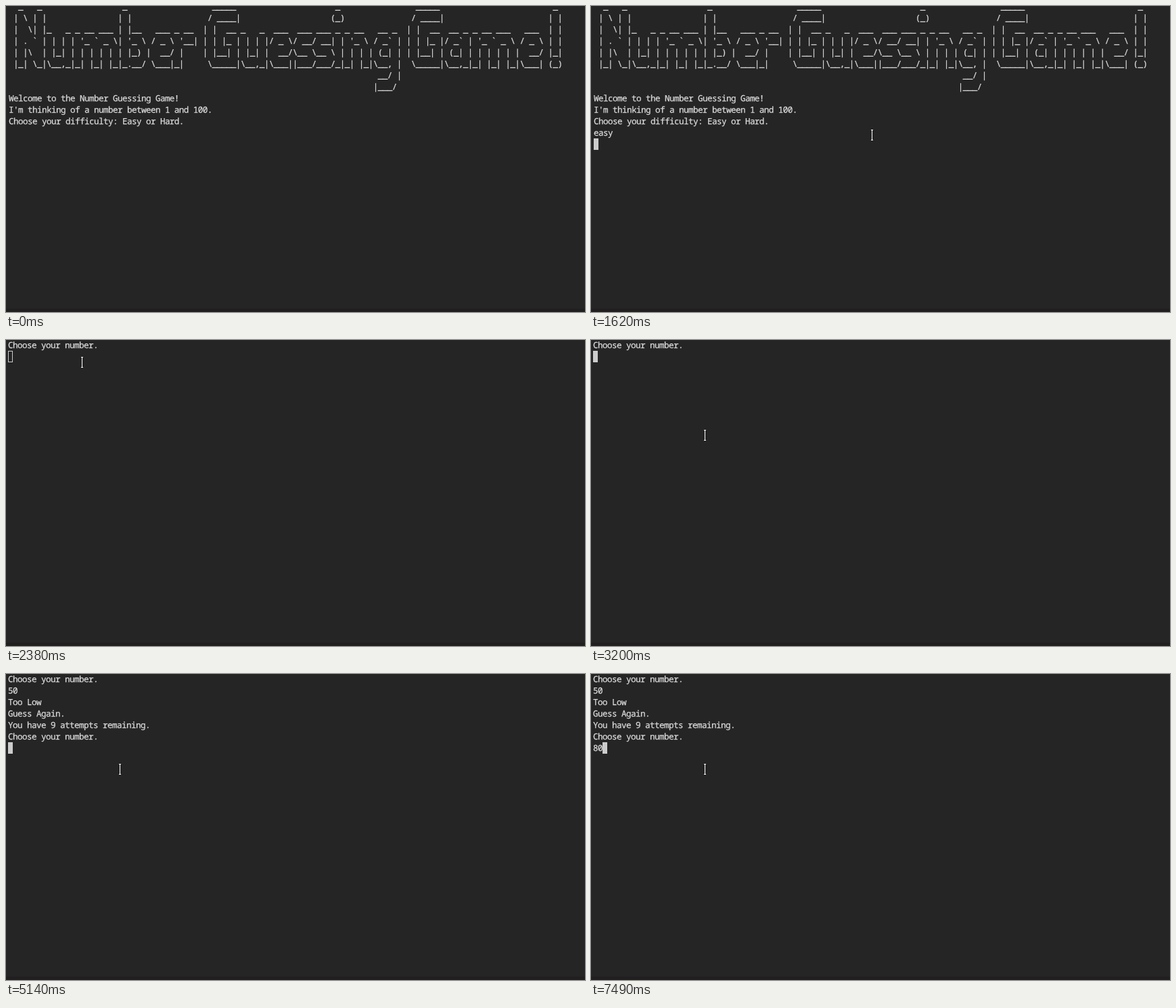
Write an HTML page that moves like this. It is 856 px wide and 453 px high and loops after 8000 ms.

```html
<!DOCTYPE html>
<html lang="en">
<head>
<meta charset="utf-8">
<title>Number guessing terminal</title>
<style>
html, body { margin: 0; width: 100%; height: 100%; overflow: hidden; background: #252525; }
#stage { position: relative; width: 856px; height: 453px; overflow: hidden; background: #252525; }
#strip { position: absolute; left: 0; top: 448px; width: 856px; height: 5px; background: #221f20; }
pre {
  position: absolute; margin: 0; color: #dcdcdc;
  font: 12.6px/17px "Noto Sans Mono", monospace;
  letter-spacing: calc(7px - .6em); /* terminal grid of 7px cells */
  -webkit-text-stroke: .25px #dcdcdc;
  font-variant-ligatures: none; text-rendering: geometricPrecision;
}
#caret { position: absolute; width: 7px; height: 17px; box-sizing: border-box; border: 1px solid #ccc; }
svg { position: absolute; left: 0; top: 0; }
</style>
</head>
<body>
<div id="stage">
  <div id="strip"></div>
  <pre id="term"></pre>
  <div id="caret"></div>
  <svg width="856" height="453" shape-rendering="crispEdges">
    <path id="beam" fill="#fff" d="M-1-8h3v1h-1v14h1v1h-3v-1h1v-14h-1z"/>
    <path id="arrow" fill="#fff" stroke="#000" d="M.5.5v16l4-4 3 6 2-1-3-6h5z"/>
  </svg>
</div>
<script>
const LOOP = 8000, CELL = 7, LINE = 17;
const $ = id => document.getElementById(id);
const term = $("term"), caret = $("caret"), beam = $("beam"), arrow = $("arrow");

// Builds a line from [column, text] pairs.
const row = (...parts) => parts.reduce((s, [col, text]) => s.padEnd(col) + text, "");

const banner = [
  row([2, "_"], [6, "_"], [24, "_"], [43, "_____"], [69, "_"], [86, "_____"], [115, "_"]),
  row([1, "| \\ | |"], [23, "| |"], [42, "/ ____|"], [68, "(_)"], [85, "/ ____|"], [114, "| |"]),
  " |  \\| |_   _ _ __ ___ | |__   ___ _ __ " +
    " | |  __ _   _  ___  ___ ___ _ _ __   __ _ " +
    " | |  __  __ _ _ __ ___   ___  | |",
  " | . ` | | | | '_ ` _ \\| '_ \\ / _ \\ '__|" +
    " | | |_ | | | |/ _ \\/ __/ __| | '_ \\ / _` |" +
    " | | |_ |/ _` | '_ ` _ \\ / _ \\ | |",
  " | |\\  | |_| | | | | | | |_) |  __/ |   " +
    " | |__| | |_| |  __/\\__ \\__ \\ | | | | (_| |" +
    " | |__| | (_| | | | | | |  __/ |_|",
  " |_| \\_|\\__,_|_| |_| |_|_.__/ \\___|_|   " +
    "  \\_____|\\__,_|\\___||___/___/_|_| |_|\\__, |" +
    "  \\_____|\\__,_|_| |_| |_|\\___| (_)",
  row([78, "__/ |"]),
  row([77, "|___/"])
].join("\n");

const intro = banner + "\nWelcome to the Number Guessing Game!" +
  "\nI'm thinking of a number between 1 and 100." +
  "\nChoose your difficulty: Easy or Hard.\n";
const ask = "Choose your number.\n";
const second = ask + "50\nToo Low\nGuess Again.\nYou have 9 attempts remaining.\n" + ask;

const screens = [
  [0, intro], [1020, intro + "e"], [1150, intro + "ea"], [1280, intro + "eas"],
  [1350, intro + "easy"], [1620, intro + "easy\n"],
  [1690, ask], [4800, ask + "5"], [4870, ask + "50"], [5070, ask + "50\n"],
  [5140, second], [7420, second + "8"], [7490, second + "80"]
];

// Pointer moves: start, end, steps, from, to, first step index.
const moves = [
  [70, 550, 8, [759, 419], [415, 191], 0],
  [2030, 2380, 6, [367, 8], [112, 33], 0],
  [2850, 3200, 6, [112, 33], [168, 141], 1]
];

const within = (t, a, b) => t >= a && t < b;
const show = (el, on) => { el.style.display = on ? "" : "none"; };
const ease = u => u * u * (3 - 2 * u);

function pointer(t) {
  const move = moves.filter(m => t >= m[0]).pop();
  if (!move || within(t, 1690, 2030)) return null;
  const [start, end, steps, from, to, first] = move;
  const gap = (end - start) / (steps - 1);
  const i = Math.min(steps - 1, Math.floor((t - start) / gap + 1e-6));
  const u = ease((i + first) / (steps - 1 + first));
  return from.map((v, k) => Math.round(v + (to[k] - v) * u));
}

let shown;
function draw(t) {
  const text = screens.filter(s => t >= s[0]).pop()[1];
  const [x, y] = t < 1690 ? [4, -8] : [3, -1];
  if (text !== shown) {
    term.textContent = shown = text;
    term.style.left = x + "px";
    term.style.top = y + "px";
  }

  const lines = text.split("\n");
  caret.style.left = x + CELL * lines[lines.length - 1].length + "px";
  caret.style.top = y + LINE * (lines.length - 1) + "px";
  const unfocused = t < 550 || within(t, 1690, 2580);
  caret.style.background = unfocused ? "none" : "#ccc";
  show(caret, t >= 70);

  const p = pointer(t), clicking = within(t, 2580, 2650);
  show(beam, p && !clicking);
  show(arrow, clicking);
  if (p) {
    beam.setAttribute("transform", `translate(${p})`);
    arrow.setAttribute("transform", `translate(${p[0]},${p[1] - 8})`);
  }
}

const began = performance.now();
function tick() {
  draw((performance.now() - began) % LOOP);
  requestAnimationFrame(tick);
}
tick();
</script>
</body>
</html>
```
